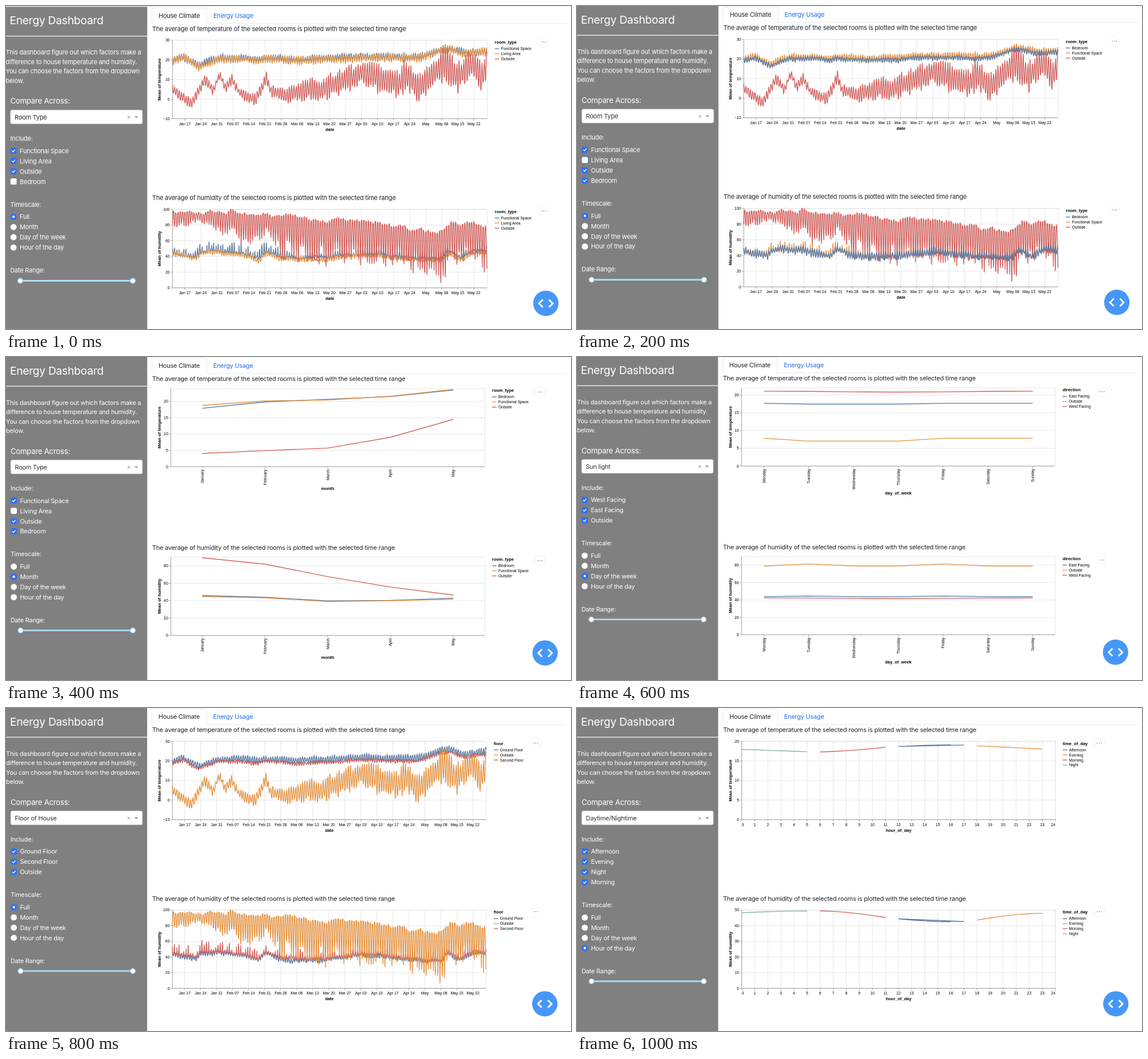
An HTML page for the animation above (1.2 s loop, 989x566 px).

```html
<!DOCTYPE html>
<html lang="en">
<head>
<meta charset="utf-8">
<title>Energy Dashboard</title>
<style>
html, body { margin: 0; width: 100%; height: 100%; overflow: hidden; background: #fff; }
svg { display: block; width: 989px; height: 566px; }
text { font: 11px Inter, "Open Sans", sans-serif; letter-spacing: -.022em; font-optical-sizing: none; fill: #212529; white-space: pre; }
.side text { fill: #fff; }
.side .title { font-size: 19.3px; letter-spacing: -.015em; }
.side .head { font-size: 13.3px; }
.side .pick { fill: #333; }
.link { fill: #1f6df6; }
.caption { letter-spacing: -.019em; }
.chart text { font: 6.9px "Liberation Sans", Arial, sans-serif; letter-spacing: 0; fill: #000; }
.chart .bold { font-weight: bold; font-size: 7.5px; }
.grid { fill: none; stroke: #ddd; stroke-width: .7; }
.axis { fill: none; stroke: #888; stroke-width: .7; }
.line { fill: none; stroke-width: 1.38; }
.scene { visibility: hidden; animation: show 1.2s step-end infinite; }
@keyframes show {
  0% { visibility: visible; }
  16.67%, 100% { visibility: hidden; }
}
</style>
</head>
<body>
<svg id="stage" viewBox="0 0 989 566"></svg>
<script>
const PALETTE = ['#5778a4', '#e49444', '#d1615d', '#85b6b2'];
const [BLUE, ORANGE, RED] = PALETTE;
const ACCENT = '#2f70f5';
const LEFT = 291.5, DAY = 4.016, DAYS = 137;

const text = (x, y, s, cls = '', more = '') =>
  `<text x="${x}" y="${y}" class="${cls}" ${more}>${s}</text>`;
const path = (d, cls, more = '') => `<path d="${d}" class="${cls}" ${more}/>`;
const range = (from, to) => Array.from({ length: to - from + 1 }, (_, i) => from + i);
const wave = (i, period) => Math.cos(2 * Math.PI * i / period);
const ease = u => Math.sin(u * Math.PI / 2);

function seeded(s) {
  return () => {
    s = (s + 0x6D2B79F5) | 0;
    let t = Math.imul(s ^ (s >>> 15), 1 | s);
    t = (t + Math.imul(t ^ (t >>> 7), 61 | t)) ^ t;
    return ((t ^ (t >>> 14)) >>> 0) / 4294967296;
  };
}

// Linear curve through a few [x, value] points
const curve = keys => x => {
  const i = Math.max(1, keys.findIndex(k => k[0] >= x));
  const [x0, v0] = keys[i - 1], [x1, v1] = keys[i];
  return v0 + (v1 - v0) * (x - x0) / (x1 - x0);
};

const outMid = curve([[291, 6], [323, -3.5], [348, 11], [363, 3.5], [373, 11], [386, 5.5], [395, 10], [416, 2.5],
  [437, 0], [456, 11], [464, 3.5], [490, 2], [590, 8.5], [625, 14], [687, 7], [698, 12], [722, 5.5],
  [767, 18.5], [790, 11], [818, 17.5], [833, 12], [845, 20]]);
const outSwing = curve([[291, 2], [460, 2.5], [510, 5], [760, 8], [845, 6.5]]);
const dampHigh = curve([[291, 97], [380, 97], [520, 88], [620, 85], [755, 68], [778, 83], [845, 78]]);
const dampLow = curve([[291, 70], [340, 88], [400, 62], [435, 58], [460, 70], [485, 38], [620, 33], [700, 26],
  [763, 11], [780, 34], [845, 24]]);
const homeTemp = curve([[291, 19.3], [311, 21], [338, 16.6], [372, 20.5], [420, 20.3], [440, 19.4], [453, 20.5],
  [515, 19.4], [620, 21], [722, 20.7], [765, 25], [780, 25.2], [800, 23], [845, 24]]);
const homeDamp = curve([[291, 44], [333, 38], [341, 45], [365, 46], [415, 42], [443, 37], [455, 45], [485, 37],
  [560, 37], [625, 43], [715, 37], [763, 36], [773, 46], [796, 37], [820, 47], [845, 44]]);

// Twelve samples a day: a daily cycle of varying strength over slow random drift
function sample(seed, value) {
  const rnd = seeded(seed);
  let gain = 1, drift = 0;
  return range(0, DAYS * 12).map(k => {
    if (k % 12 === 0) gain = .5 + .7 * rnd();
    drift = drift * .96 + rnd() - .5;
    const x = LEFT + k / 12 * DAY;
    return [x, value(x, wave(k + 1, 12) * gain, drift)];
  });
}

const outsideT = sample(3, (x, sun, drift) => outMid(x) + sun * outSwing(x) + drift * .6);
const outsideH = sample(8, (x, sun, drift) => {
  const hi = dampHigh(x), dip = Math.max(0, sun + .35) / 1.4;
  return Math.min(100, hi - (hi - dampLow(x)) * dip + drift * 1.8);
});
const roomT = (seed, swing, shift) => sample(seed, (x, sun, drift) =>
  homeTemp(x) + shift + swing * sun + drift * .25);
const roomH = (seed, swing, shift, spike = 0) => sample(seed, (x, sun, drift) =>
  homeDamp(x) + shift + swing * sun + drift * .8 + spike * Math.max(0, sun - .7) * (x < 520 ? 2 : 1));

const functionalT = roomT(21, 1.7, .6), functionalH = roomH(22, 2.2, 2.2, 10);
const livingT = roomT(31, 1.8, 0), livingH = roomH(32, 3, 0);
const bedroomT = roomT(41, 1.1, -.3), bedroomH = roomH(42, 4.4, 2);
const groundT = roomT(51, 1.7, .6), groundH = roomH(52, 3, .3);
const secondT = roomT(61, .8, -.8), secondH = roomH(62, 2.6, 2, 13);

function chart(c) {
  const { l, w, t, min, max, step } = c, h = 137.5, b = t + h, r = l + w;
  const py = v => b - (v - min) / (max - min) * h;
  let grid = `M${l} ${t}H${r}V${b}H${l}Z`, axis = `M${l} ${t}V${b}H${r}`, s = '';
  for (let v = min; v <= max; v += step) {
    const y = py(v);
    grid += `M${l} ${y}H${r}`;
    axis += `M${l} ${y}h-3.4`;
    s += text(l - 4.8, y + 2.4, String(v).replace('-', '−'), '', 'text-anchor="end"');
  }
  for (const [x, label, anchor = 'middle'] of c.ticks) {
    if (!c.turned) grid += `M${x} ${t}V${b}`;
    axis += `M${x} ${b}v3.4`;
    s += c.turned
      ? text(0, 0, label, '', `text-anchor="end" transform="translate(${x + 2.4} ${b + 4.8}) rotate(-90)"`)
      : text(x, b + 11, label, '', `text-anchor="${anchor}"`);
  }
  s += text(l + w / 2, b + c.titleGap, c.xTitle, 'bold', 'text-anchor="middle"');
  s += text(0, 0, c.yTitle, 'bold', `text-anchor="middle" transform="translate(271 ${t + h / 2}) rotate(-90)"`);
  const lines = c.lines.map(([col, pts]) =>
    path('M' + pts.map(([x, v]) => x.toFixed(1) + ' ' + py(v).toFixed(1)).join('L'), 'line', `stroke="${col}"`)).join('');
  const kx = r + 13;
  const key = text(kx, t + 6.2, c.keyTitle, 'bold') + c.keys.map((k, i) => {
    const y = t + 15 + i * 8.9;
    return path(`M${kx} ${y}h7.6`, 'line', `stroke="${PALETTE[i]}"`) + text(kx + 11, y + 2.4, k);
  }).join('');
  const menu = `<circle cx="${c.menuX}" cy="${c.menuY}" r="9.5" fill="#fff" stroke="#eee" stroke-width=".8"/>` +
    [-3.6, 0, 3.6].map(d => `<circle cx="${c.menuX + d}" cy="${c.menuY}" r="1.05" fill="#b0b0b0"/>`).join('');
  return `<g class="chart">${path(grid, 'grid')}${path(axis, 'axis')}${lines}${s}${key}${menu}</g>`;
}

// Temperature above, humidity below
function pair(o) {
  const t = o.turned ? 56.5 : 60;
  return chart({ ...o, ...o.temp, t, menuY: 63, yTitle: 'Mean of temperature' }) +
    chart({ ...o, ...o.hum, t: t + 296.4, menuY: 359, yTitle: 'Mean of humidity' });
}

// Weekly dates; the first day of a month shows only the month
const dates = range(0, 18).map(i => {
  const [month, day] = new Date(Date.UTC(2016, 0, 17 + i * 7)).toUTCString().split(' ').slice(1, 3).reverse();
  return day === '01' ? month : `${month} ${day}`;
});
const full = (keyTitle, keys, menuX, temp, hum) => pair({
  l: LEFT, w: 551, keyTitle, keys, menuX, xTitle: 'date', titleGap: 21,
  ticks: dates.map((d, i) => [313 + i * 7 * DAY, d]),
  temp: { min: -10, max: 30, step: 10, lines: temp },
  hum: { min: 0, max: 100, step: 20, lines: hum }
});

const plot = { l: 288.6, w: 550.4 };

function named(names, xTitle, titleGap, keyTitle, keys, menuX, top, temp, hum) {
  const px = i => plot.l + plot.w * (i + .5) / names.length;
  const lines = fns => fns.map((f, n) => [PALETTE[n], names.map((_, i) => [px(i), f(i)])]);
  return pair({
    ...plot, keyTitle, keys, menuX, xTitle, titleGap, turned: true,
    ticks: names.map((n, i) => [px(i), n]),
    temp: { min: 0, max: top, step: 5, lines: lines(temp) },
    hum: { min: 0, max: 90, step: 20, lines: lines(hum) }
  });
}

function hours(keys, temp, hum) {
  const px = h => plot.l + plot.w * h / 24;
  const spans = [[17, ...range(12, 16)], range(18, 23), range(6, 11), range(0, 5)];
  const lines = fns => fns.map((f, n) => [PALETTE[n], spans[n].map(h => [px(h), f(h)])]);
  return pair({
    ...plot, keyTitle: 'time_of_day', keys, menuX: 916, xTitle: 'hour_of_day', titleGap: 21,
    ticks: range(0, 24).map(h => [px(h), h, h === 0 ? 'start' : h === 24 ? 'end' : 'middle']),
    temp: { min: 0, max: 20, step: 5, lines: lines(temp) },
    hum: { min: 0, max: 50, step: 10, lines: lines(hum) }
  });
}

function checkbox(y, label, on, focus) {
  const halo = focus ? `<rect x="6.6" y="${y - 6.6}" width="13.2" height="13.2" rx="3.6" fill="${ACCENT}" opacity=".55"/>` : '';
  const tick = on ? path(`M10.8 ${y + .2}l1.7 1.7 3.2-3.5`, '', 'stroke="#fff" fill="none" stroke-width="1.4" stroke-linecap="round"') : '';
  return halo + `<rect x="7.8" y="${y - 5.4}" width="10.8" height="10.8" rx="2.5" fill="${on ? ACCENT : '#fff'}"/>` +
    tick + text(24, y + 4, label);
}
function radio(y, label, on, focus) {
  const dot = (r, fill, more = '') => `<circle cx="13.2" cy="${y}" r="${r}" fill="${fill}" ${more}/>`;
  return (focus ? dot(7, ACCENT, 'opacity=".3"') : '') + dot(5.4, on ? ACCENT : '#fff') +
    (on ? dot(2.1, '#fff') : '') + text(24, y + 4, label);
}

const intro = ['This dashboard figure out which factors make a', 'difference to house temperature and humidity.',
  'You can choose the factors from the dropdown', 'below.'];
const scales = ['Full', 'Month', 'Day of the week', 'Hour of the day'];

function sidebar({ pick, boxes, off, boxFocus, scale, scaleFocus }) {
  const up = (4 - boxes.length) * 18;
  const knob = x => `<circle cx="${x}" cy="${481.5 - up}" r="4.3" fill="#fff" stroke="#a6d5f0" stroke-width="1.3"/>`;
  return `<g class="side"><rect x="-3" y="-3" width="1000" height="4" fill="#e3e3e3"/>
    <rect x="-3" y="1.4" width="250.2" height="600" fill="#808080"/>
    <rect x="-3" y="52" width="250.2" height="1.4" fill="#ececec"/>` +
    text(6.4, 32, 'Energy Dashboard', 'title') +
    intro.map((s, i) => text(-.4, 85.4 + i * 16.5, s)).join('') +
    text(7.4, 171.4, 'Compare Across:', 'head') +
    '<rect x="7.8" y="182.2" width="231" height="24.4" rx="2.8" fill="#fff" stroke="#ccc" stroke-width=".7"/>' +
    text(15, 198.6, pick, 'pick') +
    path('M212.8 192.6l4.6 4.6m0-4.6l-4.6 4.6', '', 'stroke="#8c8c8c" fill="none"') +
    path('M224.6 193.2h6.8l-3.4 3.6z', '', 'fill="#999"') +
    text(7.4, 235.6, 'Include:') +
    boxes.map((b, i) => checkbox(253.5 + i * 18, b, i !== off, i === boxFocus)).join('') +
    text(7.4, 351.6 - up, 'Timescale:') +
    scales.map((s, i) => radio(369.4 - up + i * 17.9, s, i === scale, scaleFocus && i === scale)).join('') +
    text(7.4, 467.2 - up, 'Date Range:') +
    `<rect x="25" y="${480.1 - up}" width="197" height="2.8" rx="1.4" fill="#abdcf5"/>` +
    knob(25) + knob(222) + '</g>';
}

const caption = (y, what) =>
  text(255.8, y, `The average of ${what} of the selected rooms is plotted with the selected time range`, 'caption');
const frame = path('M255.6 30.4V6.8q0-3.6 3.6-3.6H347.8q3.6 0 3.6 3.6V30.4H983', '',
    'fill="none" stroke="#dee2e6" stroke-width=".8"') +
  text(267, 20.6, 'House Climate') + text(363, 20.6, 'Energy Usage', 'link') +
  caption(43.8, 'temperature') + caption(339.8, 'humidity') +
  '<circle cx="945" cy="521" r="22.2" fill="#4797f8"/>' +
  path('M939.6 514.6l-6.6 6.6 6.6 6.6M950.4 514.6l6.6 6.6-6.6 6.6', '',
    'stroke="#fff" stroke-width="2.9" fill="none"');

const rooms = ['Functional Space', 'Living Area', 'Outside', 'Bedroom'];
const bedFirst = ['Bedroom', 'Functional Space', 'Outside'];
const months = ['January', 'February', 'March', 'April', 'May'];
const days = ['Monday', 'Tuesday', 'Wednesday', 'Thursday', 'Friday', 'Saturday', 'Sunday'];
const midweek = i => i > 0 && i < 4 ? 1 : 0;
const values = (...v) => i => v[i];

const scenes = [
  { move: [0, 0, 1], side: { pick: 'Room Type', boxes: rooms, off: 3, scale: 0 },
    charts: full('room_type', rooms.slice(0, 3), 941,
      [[BLUE, functionalT], [ORANGE, livingT], [RED, outsideT]],
      [[BLUE, functionalH], [ORANGE, livingH], [RED, outsideH]]) },
  { move: [.6, -1.4, .9993], side: { pick: 'Room Type', boxes: rooms, off: 1, boxFocus: 1, scale: 0 },
    charts: full('room_type', bedFirst, 941,
      [[ORANGE, functionalT], [RED, outsideT], [BLUE, bedroomT]],
      [[ORANGE, functionalH], [RED, outsideH], [BLUE, bedroomH]]) },
  { move: [.5, -1.4, .998], side: { pick: 'Room Type', boxes: rooms, off: 1, scale: 1, scaleFocus: true },
    charts: named(months, 'month', 41, 'room_type', bedFirst, 936, 24,
      [values(17.9, 19.85, 20.65, 21.5, 23.5), values(18.8, 20.15, 20.45, 21.6, 23.7), values(4.05, 4.9, 5.7, 9, 14.5)],
      [values(45.9, 43.9, 39.7, 40.3, 42.9), values(44.8, 43.3, 39.1, 40, 41.8), values(89.4, 82, 67.6, 55.7, 46.4)]) },
  { move: [.3, -2.3, .9972],
    side: { pick: 'Sun light', boxes: ['West Facing', 'East Facing', 'Outside'], scale: 2, scaleFocus: true },
    charts: named(days, 'day_of_week', 50, 'direction', ['East Facing', 'Outside', 'West Facing'], 921.3, 22,
      [i => 17.65 - .23 * midweek(i), i => 7.82 - .79 * midweek(i), i => 20.94 + .14 * wave(i, 6)],
      [i => 44.1 + .5 * wave(i - 1, 3), i => 79.9 + 1.6 * wave(i - 1, 3), i => 42.05 + .35 * wave(i, 6)]) },
  { move: [.5, -1.4, .9975],
    side: { pick: 'Floor of House', boxes: ['Ground Floor', 'Second Floor', 'Outside'], scale: 0, scaleFocus: true },
    charts: full('floor', ['Ground Floor', 'Outside', 'Second Floor'], 929,
      [[BLUE, groundT], [RED, secondT], [ORANGE, outsideT]],
      [[BLUE, groundH], [RED, secondH], [ORANGE, outsideH]]) },
  { move: [.5, -1.4, .9975],
    side: { pick: 'Daytime/Nightime', boxes: ['Afternoon', 'Evening', 'Night', 'Morning'], scale: 3 },
    charts: hours(['Afternoon', 'Evening', 'Morning', 'Night'],
      [h => 18.7 + .4 * ease((h - 12) / 4), h => 18.85 - .16 * (h - 18),
        h => 17.3 + 1.2 * ((h - 6) / 5) ** 1.5, h => 17.95 - .12 * h],
      [h => 44.4 - 1.9 * ease((h - 12) / 4), h => 43.6 + 4.3 * ease((h - 18) / 5),
        h => 49.5 - 4.2 * ((h - 6) / 5) ** 1.6, h => 48.3 + 1.1 * ease(h / 5)]) }
];

document.getElementById('stage').innerHTML = scenes.map(({ move: [x, y, k], side, charts }, i) =>
  `<g class="scene" style="animation-delay:${i * 200 - 1200}ms"><rect width="989" height="566" fill="#fff"/>
  <g transform="translate(${x} ${y}) scale(${k})">${sidebar(side)}${charts}${frame}</g></g>`).join('');
</script>
</body>
</html>
```
